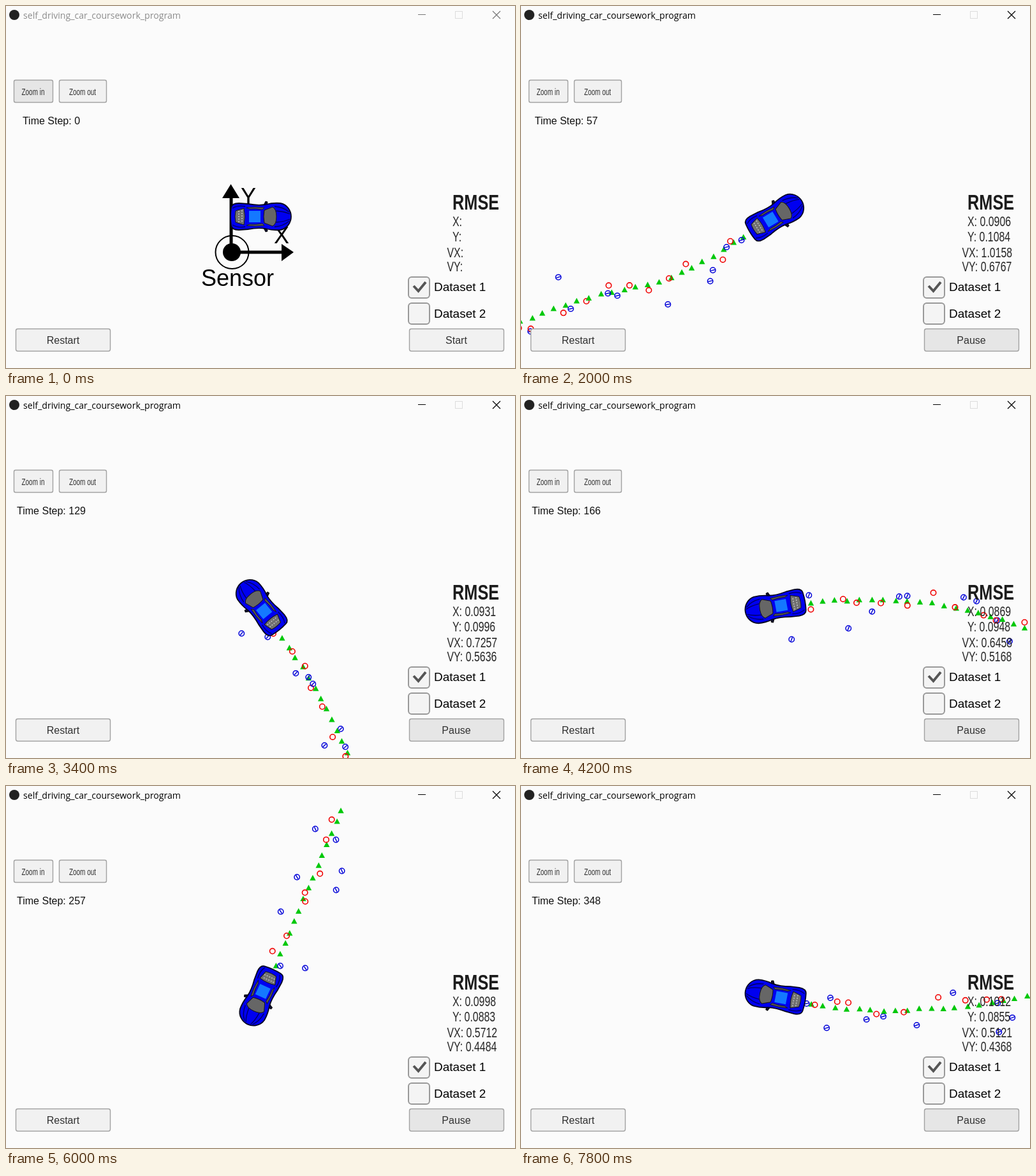
Recreate the animation shown at these times as an HTML page. Size 798 by 569 pixels, loop 8000 ms.

```html
<!DOCTYPE html>
<html lang="en">
<head>
<meta charset="utf-8">
<title>Sensor tracking</title>
<style>
html, body { margin: 0; width: 100%; height: 100%; overflow: hidden; background: #fbfbfb; }
svg { display: block; width: 798px; height: 569px; font-family: "Liberation Sans", Arial, sans-serif; }
.title { font: 14.1px "Open Sans", "Noto Sans", sans-serif; }
.button rect, .box { fill: #f1f1f1; stroke: #a2a2a2; stroke-width: 1.4; }
.button text { fill: #323232; font-size: 16px; text-anchor: middle; }
.button .small { font-size: 14.5px; }
.box { fill: #f4f4f4; stroke: #999; stroke-width: 2; }
.value { font-size: 21.5px; fill: #262626; }
.est { fill: #00c80a; }
.lidar { fill: none; stroke: #f00000; stroke-width: 1.6; }
.radar { fill: none; stroke: #0000d8; stroke-width: 1.5; }
</style>
</head>
<body>
<svg viewBox="0 0 798 569">
  <defs>
    <clipPath id="view"><rect y="30" width="798" height="539"/></clipPath>
    <path id="tri" d="M0 -4.5 4.7 4.2H-4.7Z"/>
  </defs>

  <g clip-path="url(#view)">
    <g id="world">
      <path d="M353 387V300M353 387H434" stroke="#000" stroke-width="5"/>
      <path d="M352.500 280 366 302H339ZM451 387 432 374V401Z"/>
      <circle cx="354" cy="387" r="14"/>
      <circle cx="354.500" cy="387" r="26" fill="none" stroke="#000" stroke-width="2"/>
      <g font-size="36">
        <text x="306" y="440">Sensor</text>
        <text x="368" y="312">Y</text>
        <text x="420" y="373">X</text>
      </g>
      <g id="trail"></g>
    </g>
    <g id="car" stroke-linejoin="round">
      <path d="M5 -18 8 -24 11 -23 10 -17ZM5 18 8 24 11 23 10 17Z" fill="#101030" stroke="#000"/>
      <path d="M-46 -14Q-45 -21 -34 -21L-20 -20Q-4 -17 8 -19Q20 -22 31 -21C42 -19 48 -9 48 0C48 9 42 19 31 21Q20 22 8 19Q-4 17 -20 20L-34 21Q-45 21 -46 14Q-48 0 -46 -14Z"
        fill="#0000f0" stroke="#050520" stroke-width="1.8"/>
      <path d="M22 -16Q36 -15 45 -7M22 16Q36 15 45 7M24 -9Q38 -8 46 -4M24 9Q38 8 46 4M-44 -13Q-36 -18 -24 -16M-44 13Q-36 18 -24 16"
        fill="none" stroke="#000060" stroke-width="1.3"/>
      <path d="M6 -10 19 -15Q25 -12 25 0Q25 12 19 15L6 10Q4 0 6 -10Z" fill="#666" stroke="#181818"/>
      <path d="M-39 -9 -26 -13Q-23 0 -26 13L-39 9Q-41 0 -39 -9Z" fill="#707070" stroke="#181818"/>
      <path d="M-34 -9V9M-29 -10V10" stroke="#c4c4c4" stroke-width="1.5" stroke-dasharray="2 2"/>
      <path d="M-22 -14Q-8 -16 6 -14L3 -11Q-8 -13 -17 -12ZM-22 14Q-8 16 6 14L3 11Q-8 13 -17 12Z" fill="#555" stroke="#181818" stroke-width=".8"/>
      <rect x="-18" y="-9" width="18" height="18" fill="#1478ff"/>
    </g>
  </g>

  <g id="bar">
    <circle cx="13" cy="14" r="8" fill="#222"/>
    <text class="title" x="27" y="20">self_driving_car_coursework_program</text>
    <path id="controls" d="M646 13.500H658M763 8 775 20M775 8 763 20" stroke-width="1.2"/>
    <rect x="704.500" y="8.500" width="11" height="11" fill="none" stroke="#ddd"/>
  </g>

  <g class="button"><rect id="zoom" x="12.500" y="116.500" width="61" height="35" rx="2.500"/>
    <text class="small" transform="translate(42.500 140) scale(.69 1)">Zoom in</text></g>
  <g class="button"><rect x="83.500" y="116.500" width="74" height="35" rx="2.500"/>
    <text class="small" transform="translate(120 140) scale(.69 1)">Zoom out</text></g>
  <text id="count" x="71" y="186" font-size="16" fill="#111" text-anchor="middle">Time Step: 0</text>

  <text transform="translate(700 319.500) scale(.745 1)" font-size="34" font-weight="700" fill="#1c1c1c">RMSE</text>
  <g id="values"></g>

  <rect class="box" x="631" y="426" width="33" height="33" rx="5"/>
  <path d="M639 440 646.500 448 658 434" fill="none" stroke="#555" stroke-width="4"/>
  <rect class="box" x="631" y="467" width="33" height="33" rx="5"/>
  <g font-size="19"><text x="671" y="448">Dataset 1</text><text x="671" y="490">Dataset 2</text></g>

  <g class="button"><rect x="15.500" y="507.500" width="148" height="35" rx="3"/><text x="89.500" y="531">Restart</text></g>
  <g class="button"><rect id="goBox" x="632.500" y="507.500" width="148" height="35" rx="3"/><text id="go" x="706" y="531">Start</text></g>
</svg>

<script>
const LOOP = 8000, START = 800, TICK = 200, SPEED = 18.9, LAST = 348, CX = 399, CY = 331;
const $ = id => document.getElementById(id);

// [ms, time step, x, y, vx, vy]
const readings = [
  [800, 1, .12, .08, 5.2, .02],
  [1200, 20, .1, .12, 1.7, 1],
  [2000, 57, .0906, .1084, 1.0158, .6767],
  [3400, 129, .0931, .0996, .7257, .5636],
  [4200, 166, .0869, .0948, .6458, .5168],
  [5200, 215, .1043, .0904, .6101, .4769],
  [6800, 298, .0953, .0862, .5323, .4198],
  [7800, LAST, .1012, .0855, .5121, .4368]
];

// [time step, heading in degrees]
const bends = [
  [0, 0], [36, 21], [44, 10], [50, 31], [57, 31], [115, 113], [129, 129],
  [148, 164], [162, 186], [195, 222], [207, 231], [212, 246], [215, 241],
  [245, 248], [280, 240], [298, 229], [327, 192], [338, 180], [348, 169]
];

function lerp(rows, at, col = 1) {
  let i = 1;
  while (i < rows.length - 1 && rows[i][0] < at) i++;
  const a = rows[i - 1], b = rows[i];
  return a[col] + (b[col] - a[col]) * (at - a[0]) / (b[0] - a[0]);
}

// Seeded random numbers, peaked around 0 within -1..1
let seed = 7;
function random() {
  seed = (seed * 16807) % 2147483647;
  return seed / 2147483647;
}
const spread = size => size * (random() + random() - 1);

function add(parent, tag, attrs) {
  const el = document.createElementNS("http://www.w3.org/2000/svg", tag);
  for (const key in attrs) el.setAttribute(key, attrs[key]);
  return parent.appendChild(el);
}

const shapes = {
  est: g => add(g, "use", { href: "#tri" }),
  lidar: g => add(g, "circle", { r: 4.2 }),
  radar: (g, x, y) => {
    const bearing = Math.atan2(y - 387, x - 354) * 180 / Math.PI;
    add(g, "circle", { r: 4.2 });
    add(g, "path", { d: "M-3.500 0H3.500", transform: `rotate(${bearing})` });
  }
};

const marks = [];
function mark(kind, step, size) {
  const x = route[step][0] + spread(size), y = route[step][1] + 3 + spread(size);
  const el = add($("trail"), "g", { class: kind, transform: `translate(${x} ${y})` });
  shapes[kind](el, x, y);
  marks.push({ el, step });
}

// Every step gives an estimate and, in turn, a lidar or radar measurement
const route = [[CX, CY]];
for (let s = 1; s <= LAST; s++) {
  const a = lerp(bends, s - .5) * Math.PI / 180, [x, y] = route[s - 1];
  route.push([x + SPEED * Math.cos(a), y - SPEED * Math.sin(a)]);
  mark("est", s, 2);
  if (s % 2) mark("lidar", s, 20);
  else mark("radar", s, 55);
}

const names = ["X:", "Y:", "VX:", "VY:"];
const values = names.map((name, i) => add($("values"), "text", {
  class: "value",
  transform: `translate(${i < 2 ? 700 : 691.5} ${[346, 370, 394.5, 416.5][i]}) scale(.74 1)`
}));

let shown = -1;
function draw(now) {
  const tick = Math.floor(now % LOOP / TICK) * TICK, on = tick >= START;
  if (tick !== shown) {
    shown = tick;
    const step = on ? Math.round(lerp(readings, tick)) : 0, [x, y] = route[step];
    $("world").setAttribute("transform", `translate(${CX - x} ${CY - y})`);
    $("car").setAttribute("transform", `translate(${CX} ${CY}) rotate(${-lerp(bends, step)})`);
    for (const m of marks) m.el.style.display = m.step <= step ? "" : "none";
    $("count").textContent = "Time Step: " + step;
    values.forEach((el, i) => {
      el.textContent = names[i] + (on ? " " + lerp(readings, tick, i + 2).toFixed(4) : "");
    });
    $("go").textContent = on ? "Pause" : "Start";
    $("goBox").style.fill = on ? "#e6e6e6" : "#f1f1f1";
    $("zoom").style.fill = on ? "#f1f1f1" : "#e6e6e6";
    $("bar").style.fill = on ? "#000" : "#8c8c8c";
    $("controls").style.stroke = on ? "#000" : "#777";
  }
  requestAnimationFrame(() => draw(performance.now()));
}
draw(performance.now());
</script>
</body>
</html>
```
